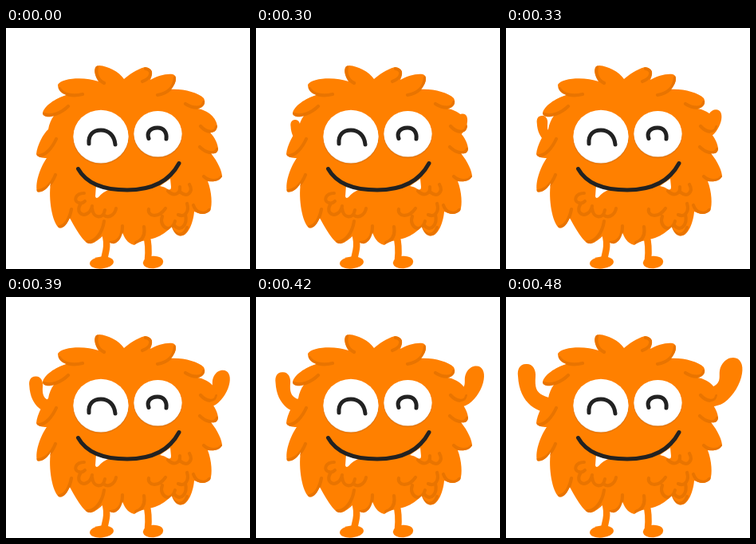
An HTML page with a canvas for the animation above (0.65 s loop, 306x302 px).

```html
<!DOCTYPE html>
<html lang="en">
<head>
<meta charset="utf-8">
<title>Waving monster</title>
<style>
  html, body { margin: 0; width: 100%; height: 100%; overflow: hidden; background: #fff; }
  canvas { display: block; }
</style>
</head>
<body>
<canvas id="stage" width="306" height="302"></canvas>
<script>
const ctx = document.getElementById('stage').getContext('2d');
const ORANGE = '#ff8000', SHADE = '#e97400', INK = '#222';
const LOOP = 650, RISE_START = 270, STEP = 30, STEPS = 8, GROWTH = 0.0785;

// Fur outline, clockwise from the top tuft
const furTop = 'M116 67C110 58 109 47 117 47C128 48 141 54 148 64C154 59 163 52 174 49' +
  'C184 50 185 56 181 65C190 60 200 57 209 58C216 60 213 70 207 77';
const furRight = 'C222 76 241 81 248 88C252 96 245 101 240 101C254 103 264 113 265 123' +
  'C264 129 261 131 256 131C262 137 266 146 266 152C265 157 261 158 257 157' +
  'C266 168 271 180 271 186C268 192 260 193 253 192C258 205 259 222 256 229C250 235 242 233 236 230';
const furBottom = 'C235 243 229 258 222 260C215 262 210 256 208 249C202 255 195 260 187 263' +
  'C178 266 168 266 161 272C152 270 148 262 146 256' +
  'C144 266 138 271 133 270C126 267 123 264 121 261C114 267 109 271 104 270';
const furLeft = 'C98 269 89 255 80 238C75 249 70 252 66 250' +
  'C58 243 53 215 56 194C51 203 44 207 39 205C36 193 44 173 51 163C46 163 39 162 38 158' +
  'C39 147 47 132 53 127C54 120 57 114 60 110C52 113 46 110 46 107' +
  'C47 98 62 88 76 84C69 82 65 77 65 71C70 62 100 61 116 67Z';
const body = new Path2D(furTop + furRight + furBottom + furLeft);

const tuftLines = new Path2D(
  'M114 49C112 57 115 65 123 69M175 51C184 52 184 62 171 67M190 84C203 82 211 74 212 62' +
  'M67 76C72 84 84 86 96 83M47 108C57 112 70 106 78 98M40 160C49 161 58 150 63 139' +
  'M40 204C51 203 58 194 62 184M67 249C75 248 80 238 82 227');
const edgeLines = new Path2D(
  'M225 95C234 101 247 102 248 93M244 123C252 132 263 132 264 124' +
  'M243 149C251 157 262 159 265 152M248 186C254 192 265 193 270 187' +
  'M235 222C238 232 250 235 255 228M208 253C214 262 224 260 227 250' +
  'M173 249C175 260 171 266 163 269M131 269C141 269 146 261 146 248' +
  'M102 268C112 269 121 256 123 242');
const bellyLines = new Path2D(
  'M98 207C87 207 84 217 91 219Q95 221 99 217M94 220C87 230 95 236 101 233Q107 230 108 223' +
  'M108 226C109 239 122 240 124 228M122 234C129 240 137 233 138 226' +
  'M179 227C177 235 190 240 200 226M196 236C191 249 207 259 212 242' +
  'M211 247C219 257 228 246 225 234M216 234C225 238 230 229 227 220' +
  'M203 204C210 212 219 208 218 199M219 206C228 213 235 205 230 196');

// Each arm grows out of its shoulder
const arms = [
  { x: 75.5, y: 150, path: new Path2D(
    'M25 84C33 83 38 91 37 100C36 113 38 119 46 123C53 127 60 127 68 127L66 146' +
    'C52 147 40 143 31 136C22 128 16 117 15 99C14 91 17 84 25 84Z') },
  { x: 230, y: 143, path: new Path2D(
    'M285 76C294 76 298 85 296 96C294 109 285 124 274 132C265 138 255 138 243 137' +
    'L242 115C253 115 264 113 267 105C269 99 266 94 270 86C274 79 279 76 285 76Z') }
];

const legs = new Path2D('M125 260C128 274 125 280 123 290M176 260C179 270 179 280 178 290');
const teeth = new Path2D(
  'M113 197L112 211Q113 215 117 211Q121 206 128 203ZM193 198Q199 199 203 202Q207 204 207 199L206 189Z');
const mouth = new Path2D('M90.5 176.5C102 197 126 203 152 203C184 203 205 192 217 169.5');
const smiles = new Path2D(
  'M104 145C103 133 110 128 119 128C129 128 136 135 137 146' +
  'M179 138.5C176 131 181 125 190 125C198 125 202 131 201 139');

function stroke(path, color, width) {
  ctx.strokeStyle = color;
  ctx.lineWidth = width;
  ctx.stroke(path);
}

function fill(path, color) {
  ctx.fillStyle = color;
  ctx.fill(path);
}

function oval(x, y, rx, ry, color, tilt = 0) {
  const p = new Path2D();
  p.ellipse(x, y, rx, ry, tilt, 0, Math.PI * 2);
  fill(p, color);
}

function eye(x, y, rx, ry) {
  oval(x, y + 2, rx + 0.3, ry, SHADE);
  oval(x, y + 0.4, rx, ry, '#e8e4e0');
  oval(x, y - 0.3, rx, ry, '#fff');
}

function drawArms(t) {
  if (t < RISE_START) return;
  const step = Math.min(STEPS, Math.floor((t - RISE_START) / STEP) + 1);
  const size = 1 - GROWTH * (STEPS - step);
  for (const { x, y, path } of arms) {
    ctx.save();
    ctx.translate(x, y);
    ctx.scale(size, size);
    ctx.translate(-x, -y);
    fill(path, ORANGE);
    ctx.restore();
  }
}

function drawFur() {
  fill(body, ORANGE);
  ctx.save();
  ctx.clip(body);
  for (const lines of [tuftLines, edgeLines, bellyLines]) stroke(lines, SHADE, 4.2);
  ctx.restore();
}

function draw(t) {
  ctx.fillStyle = '#fff';
  ctx.fillRect(0, 0, 306, 302);
  ctx.lineCap = ctx.lineJoin = 'round';

  drawArms(t);
  stroke(legs, ORANGE, 8.5);
  oval(120, 294, 15, 7.5, ORANGE, -0.1);
  oval(184.5, 293.5, 12.7, 7.8, ORANGE, -0.08);
  drawFur();

  eye(119, 136, 34.5, 33);
  eye(190.5, 132.7, 30, 28.5);
  stroke(smiles, INK, 5);
  fill(teeth, '#fff');
  stroke(mouth, INK, 5);
}

const start = performance.now();
function frame() {
  draw((performance.now() - start) % LOOP);
  requestAnimationFrame(frame);
}
frame();
</script>
</body>
</html>
```
